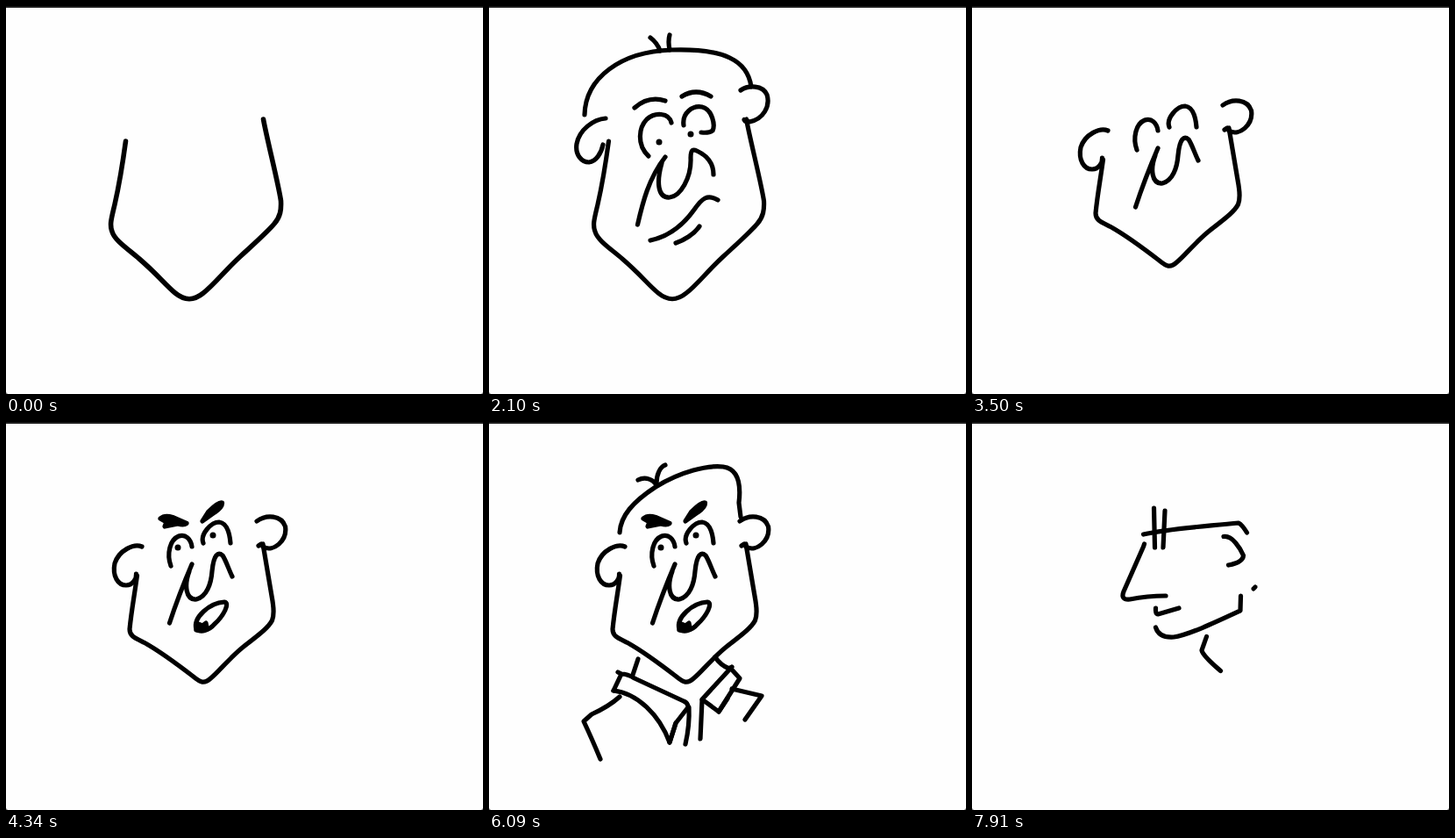
Recreate the animation shown at these times as an HTML page. Size 544 px wide and 442 px high, loop 8000 ms.

```html
<!DOCTYPE html>
<html lang="en">
<head>
<meta charset="utf-8">
<title>Sketched faces</title>
<style>
  html, body { margin: 0; width: 100%; height: 100%; overflow: hidden; background: #fefefe; }
  svg { display: block; width: 100vw; height: 100vh; }
  .ink path { fill: none; stroke: #000; stroke-width: 5.2; stroke-linecap: round; stroke-linejoin: round; }
  .ink path.solid { fill: #000; }
  .ink path.dot { stroke-width: 7; }
  .ink path.fresh { stroke-width: 5.6; }
</style>
</head>
<body>
<svg viewBox="0 0 544 442">
  <rect width="544" height="442" fill="#fefefe"/>
  <rect width="544" height="2" fill="#1c1c1c"/>
  <path d="M0 440v2h2zM544 440v2h-2z" fill="#777"/>
  <g class="ink"></g>
</svg>
<script>
const LOOP = 8000, BEAT = 140;
const ink = document.querySelector('.ink');

const dot = (x, y) => ({ d: `M${x} ${y}h.01`, kind: 'dot' });
const solid = d => ({ d, kind: 'solid' });
const beats = (start, count) => Array.from({ length: count }, (_, i) => start + i * BEAT);

// Each drawing starts on a cleared page and gains one stroke per time.
const drawings = [
  {
    end: 2730,
    times: [0, ...beats(70, 8), 1260, 1330, ...beats(1540, 6), ...beats(2310, 3)],
    strokes: [
      'M136.5 154C133 180 129 204 124 226C120 243 118 249 121 257C124 267 138 276 152 288C173 306 181 317 193 327C204 336 214 336 225 327C237 318 249 302 267 285.5C285 269 298 257.5 306 248C313 240 314 232 313.5 222C311 204 297 149 293.5 129',
      'M133 128C119 129 103 141 100 157C98 170 106 178 114 178C122 177 128 168 130 158',
      'M287 96C296 90 312 90 317 101C321 114 313 129 297 132L291 129.5L292 131',
      'M169.5 249C175 225 182 196 201 172',
      'M197 179C191 200 192 219 206 218C218 217 231 196 230 173C230 163 233 163 237 165C248 170 256 178 256 192',
      'M182 171C168 158 171 138 180 129C189 121 205 121 208 133',
      'M222 136C220 122 232 113 243 115C255 118 258 136 255 142Q251 145 242 144',
      'M184 267C208 262 224 246 234 232C243 219 249 214 261 221',
      'M213 270C222 267 234 260 240 251',
      dot(194, 155),
      dot(230, 146),
      'M166 116Q182 102 201 108',
      'M220 103Q236 93 253 103',
      'M109 124C110 82 150 52 208 50C268 48 295 62 299 92',
      'M195 51Q192 42 184 36',
      'M206 50Q204 40 206 33',
      'M217 50Q221 42 229 38',
      'M158 297L150 328',
      'M262 295L270 325',
      'M150 328Q174 354 207 359Q244 354 270 325'
    ]
  },
  {
    end: 6790,
    times: [...beats(2730, 5), ...beats(3500, 8), ...beats(4550, 8), ...beats(5670, 8)],
    strokes: [
      'M149.5 175C147 194 143 215 141 236C141 244 147 246 158 251.5C177 262 198 278 213 289.5C222 297 226 299 234 291.5C242 285 254 270 269 257.5C286 244 299 235 303.5 226C306.5 218 305 212 304 204L293 139',
      'M155 142C146 138 129 146 124 161C121 176 128 186 137 186C145 186 149 178 148.5 173',
      'M286 113C297 105 314 106 318.5 119C321 135 305 149 293 142L291 139L288 141',
      'M186.5 229Q197 197 212 162M209 170C203 186 205 203 217 202C229 199 234 184 235 170C237 150 242 148 247 152C251 158 254 168 258 176',
      'M188 164C183 150 187 134 197 130C205 127 211 134 212 142',
      'M225 138C221 128 234 114 243 114C252 115 255 126 256 138',
      dot(196, 143),
      dot(236, 129),
      'M217 236C213 223 232 206 249 205C256 206 248 221 238 230C231 238 222 240 217 236Z',
      solid('M217 237L219 230L224 232L228 229L229 234Q224 239 217 237Z'),
      solid('M176 110Q181 105.5 190 108.5L206 115.5Q203 118 196 116L181 119L183 114Z'),
      solid('M224 113L231 102Q243 90 246.5 92Q247 97 238 103Z'),
      'M149 126C150 107 164 91 190 74C219 56 250 49 267 51C282 53 288 67 285 92L287 108',
      'M170 66C178 62 187 65 191 72',
      'M201 49C195 51 191 60 191 70',
      'M170 270L164 288',
      'M258 268Q264 277 274 281',
      'M147 285L151 287L142 306M151 287Q158 287 166 292L222 318Q227 320 227 325L213 343L206 365',
      'M142 306C169 309 194 333 206 365L213 343',
      'M228 325Q229 345 224 367',
      'M241 361L243 317',
      'M277 279L243 316L262 330L272 315',
      'M275 280L286 292L262 330',
      'M149 313C139 322 128 328 117 333L108 341Q117 360 127 384',
      'M277 304L311 312L292 339',
      'M299 126Q309 122 306 132',
      'M131 169Q132 159 141 160',
      'M108 341Q84 358 76 384',
      'M311 312Q340 336 354 384'
    ]
  },
  {
    end: LOOP,
    times: beats(6790, 9),
    strokes: [
      'M196.5 139L195.5 142L173 193Q169 203 180 202Q200 198 221 198',
      'M209.5 212Q209 219 212 219Q219 217 236 212',
      'M209.5 234Q213 246 230 245C246 243 278 228 306 215L306.5 198',
      'M207.5 98L208.5 143',
      'M220 101L218 143',
      'M195.5 128C226 121 266 119 304 115Q308 117 313.5 126',
      'M287 130.5C297 129 306 144 309.5 152Q309 160 292.5 163',
      'M267.5 244.5L262 260Q263 266 283.5 283.5',
      'M321 190L323 188'
    ]
  }
];

for (const { end, times, strokes } of drawings) {
  strokes.forEach((stroke, i) => {
    const { d, kind = '' } = typeof stroke === 'string' ? { d: stroke } : stroke;
    const path = document.createElementNS('http://www.w3.org/2000/svg', 'path');
    path.setAttribute('d', d);
    if (kind) path.classList.add(kind);
    ink.append(path);
    strokes[i] = { path, from: times[i], to: end };
  });
}

function draw(time) {
  for (const { times, strokes } of drawings) {
    for (const { path, from, to } of strokes) {
      path.style.display = time >= from && time < to ? '' : 'none';
    }
    // The opening line of a drawing looks heavier until the next one is added.
    strokes[0].path.classList.toggle('fresh', time < times[1]);
  }
}

const start = performance.now();
function tick() {
  draw((performance.now() - start) % LOOP);
  requestAnimationFrame(tick);
}
tick();
</script>
</body>
</html>
```
